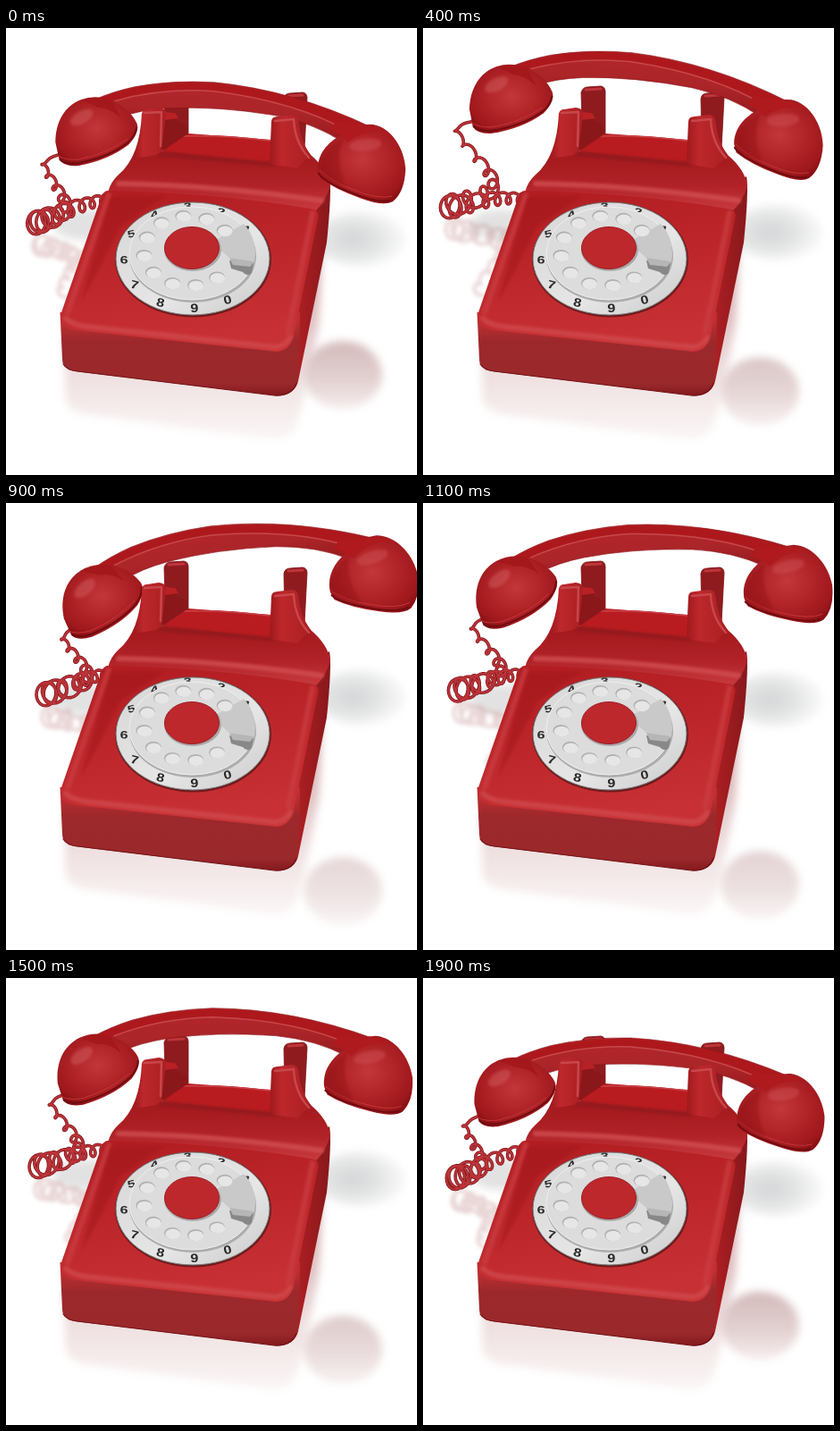
Animation, 460 px wide and 500 px high, one loop 2900 ms. Source, as an HTML page:

```html
<!DOCTYPE html>
<html lang="en">
<head>
<meta charset="utf-8">
<title>Ringing telephone</title>
<style>
html, body { margin: 0; width: 100%; height: 100%; overflow: hidden; background: #fff; }
svg { display: block; width: 460px; height: 500px; }
.line { fill: none; stroke-linecap: round; stroke-linejoin: round; }
.soft { filter: blur(5px); }
.mist { filter: blur(2px); }
.glow { filter: blur(1.5px); }
text { font: bold 14px "Liberation Sans", Arial, sans-serif; fill: #292929; text-anchor: middle; }
</style>
</head>
<body>
<svg viewBox="0 0 460 500">
  <defs>
    <linearGradient id="floor" x1="0" y1="0" x2="0" y2="1">
      <stop offset=".25" stop-color="#d9b4b5"/><stop offset=".65" stop-color="#eedfdf"/><stop offset="1" stop-color="#fbf6f6"/>
    </linearGradient>
    <linearGradient id="blob" x1="0" y1="0" x2="0" y2="1">
      <stop offset="0" stop-color="#d3b9ba"/><stop offset=".55" stop-color="#e2d0d0"/><stop offset="1" stop-color="#f6eded"/>
    </linearGradient>
    <radialGradient id="shade" cx=".42">
      <stop offset="0" stop-color="#d4d6d7"/><stop offset=".6" stop-color="#e3e4e4"/><stop offset="1" stop-color="#f4f4f4"/>
    </radialGradient>
    <linearGradient id="plate" x1="0" y1="0" x2=".25" y2="1">
      <stop offset="0" stop-color="#b01c20"/><stop offset=".45" stop-color="#bb2529"/><stop offset="1" stop-color="#c73135"/>
    </linearGradient>
    <linearGradient id="front" x1="0" y1="0" x2="0" y2="1">
      <stop offset=".1" stop-color="#bd2f33"/><stop offset=".35" stop-color="#9c282b"/><stop offset=".85" stop-color="#9a292c"/><stop offset="1" stop-color="#83191d"/>
    </linearGradient>
    <linearGradient id="side">
      <stop offset="0" stop-color="#c12a2f"/><stop offset=".5" stop-color="#a41d21"/><stop offset="1" stop-color="#86181c"/>
    </linearGradient>
    <linearGradient id="neck" x1="0" y1="0" x2="0" y2="1">
      <stop offset="0" stop-color="#b91d21"/><stop offset=".45" stop-color="#a51a1e"/><stop offset=".75" stop-color="#b02227"/><stop offset="1" stop-color="#c73a3f"/>
    </linearGradient>
    <linearGradient id="prong">
      <stop offset="0" stop-color="#9e191d"/><stop offset=".3" stop-color="#bd282c"/><stop offset="1" stop-color="#aa1f23"/>
    </linearGradient>
    <linearGradient id="grip" x1="0" y1="0" x2="0" y2="1">
      <stop offset="0" stop-color="#b4262a"/><stop offset=".5" stop-color="#ab2529"/><stop offset="1" stop-color="#971a1e"/>
    </linearGradient>
    <radialGradient id="cup" cx=".5" cy=".45" r=".62">
      <stop offset="0" stop-color="#c2373b"/><stop offset=".5" stop-color="#b02327"/><stop offset=".85" stop-color="#9e181c"/><stop offset="1" stop-color="#880f13"/>
    </radialGradient>
    <linearGradient id="ring" x1="0" y1="0" x2="1" y2="1">
      <stop offset="0" stop-color="#d6d6d6"/><stop offset=".6" stop-color="#e6e6e6"/><stop offset="1" stop-color="#cacaca"/>
    </linearGradient>
  </defs>

  <!-- floor -->
  <ellipse id="rear" cx="396" rx="50" ry="31" fill="url(#shade)" class="soft"/>
  <ellipse cx="88" cy="220" rx="36" ry="17" fill="#e2e2e2" class="soft"/>
  <path class="soft" fill="url(#floor)" d="M66 350L354 245L350 330Q338 400 326 442Q318 462 296 460L88 432Q66 428 66 410Z"/>
  <ellipse id="pool" cx="377" rx="44" ry="38" fill="url(#blob)" class="soft"/>
  <path id="ghost" class="line mist" stroke="#b46f72" stroke-width="4" opacity=".28"/>

  <!-- cord -->
  <path class="line cord" stroke="#85191d" stroke-width="3.6"/>
  <path class="line cord" stroke="#bd3439" stroke-width="1.9"/>

  <!-- rear prongs -->
  <g stroke="#7f1115" stroke-width=".8" fill="#8f1b1f">
    <path d="M177 72Q179 66 184 66L199 65Q204 66 204 71V119L190 126L178 106Z"/>
    <path d="M311 79Q312 73 318 73L332 72Q337 73 337 78L334 135L312 126Z"/>
  </g>
  <path class="line" stroke="#bf353a" stroke-width="3" d="M182 69L199 68M316 76L332 75"/>

  <!-- body -->
  <path fill="url(#side)" d="M340 178L362 166Q365 180 359 240L327 395Q324 409 306 411L314 345Z"/>
  <path fill="url(#neck)" d="M152 95L175 138L187 120Q240 118 297 126L300 150L327 102Q330 128 341 142Q360 158 363 176Q358 194 347 204L114 184Q117 172 126 164Q150 144 152 95Z"/>
  <path fill="#b91c20" d="M204 118L297 125V151L176 138Z"/>
  <path fill="#931a1e" class="glow" d="M174 138L297 150L302 155L168 143Z"/>
  <path class="line" stroke="#c94449" stroke-width="1.5" d="M198 121Q245 120 296 126"/>
  <path fill="url(#front)" d="M60.5 318H329L327 393Q323 413 301 411L77 384Q63 382 63 370Z"/>
  <path fill="url(#plate)" d="M114 182Q235 184 346 203Q351 207 349 214L322 344Q317 362 302 362L77 338Q60 335 61 321L106 191Q109 182 114 182Z"/>
  <path class="line glow" stroke="#d04e52" stroke-width="6" opacity=".8" d="M126 174Q235 176 353 193"/>
  <path class="line glow" stroke="#c93d42" stroke-width="6" opacity=".75" d="M343 207L316 340M115 187L69 318"/>
  <path fill="#a0171b" opacity=".5" class="glow" d="M117 189L178 188L128 222L105 268L84 306Z"/>
  <path class="line glow" stroke="#d04c50" stroke-width="6" opacity=".7" d="M67 325Q74 332 90 334L302 357Q314 355 318 346"/>
  <path class="line" stroke="#741216" stroke-width="1.2" d="M64 376Q69 383 80 384L300 411Q320 412 325 397"/>

  <!-- dial -->
  <ellipse cx="209.5" cy="259" rx="87.5" ry="64.5" fill="#70191b"/>
  <ellipse cx="209" cy="258" rx="86" ry="63" fill="url(#ring)" stroke="#777"/>
  <g id="digits"></g>
  <ellipse cx="209" cy="255" rx="71" ry="52" fill="#adadad"/>
  <ellipse cx="208" cy="252" rx="70" ry="52" fill="#dcdcdc" stroke="#efefef"/>
  <path fill="#c9c9c9" d="M230 240L266 219Q282 236 278 261L250 257Z"/>
  <g id="holes"></g>
  <ellipse cx="209" cy="248" rx="32" ry="24" fill="#a9a9a9"/>
  <ellipse cx="208" cy="246" rx="30.5" ry="23.5" fill="#bd282d" stroke="#9f1c22"/>
  <path fill="#888" d="M250 260L277 263L275 274Q270 279 265 273L252 269Z"/>
  <path fill="#b6b6b6" d="M250 257L278 261L273 267L254 265Z"/>

  <!-- handset -->
  <g id="handset">
    <path fill="url(#grip)" stroke="#8b1216" stroke-width=".6" d="M98 92Q118 82 143 75.500Q185 66 232 67Q320 72 409 110L378 128Q345 108 300 101Q235 93 180 98Q150 101 129 110L108 105Z"/>
    <path fill="#ad181c" d="M99 92Q118 83 143 76.500Q185 67 232 68Q320 73 402 108L386 117Q325 85 232 77Q175 75 122 92Z"/>
    <path class="line" stroke="#c6484c" stroke-width="1.500" d="M122 92Q175 75 232 77Q325 85 386 117"/>
    <path fill="url(#cup)" d="M57 141C56 119 65 100 84 92Q99 86 116 91Q138 99 147 116Q151 126 139 140Q118 158 84 166Q67 168 62 160Z"/>
    <path class="line" stroke="#6f0c10" stroke-width="2" d="M63 160Q69 165 84 163Q118 155 138 138Q146 130 147 121"/>
    <path class="line" stroke="#c5383d" stroke-width=".9" d="M61 156Q69 161 84 159Q116 151 137 134"/>
    <path fill="#a4171b" d="M86 93Q101 86 118 92L129 111Q117 100 103 100Z"/>
    <ellipse cx="85" cy="112" rx="14" ry="7" fill="#d56a6d" opacity=".4" transform="rotate(-32 85 112)" class="glow"/>
    <path fill="url(#cup)" d="M351 160C350 140 363 127 379 118Q394 106 411 107C432 110 447 133 449 155Q449 181 436 192Q426 198 401 190Q371 181 354 169Z"/>
    <path class="line" stroke="#6f0c10" stroke-width="2" d="M352 164Q359 173 387 183Q418 195 433 191"/>
    <path class="line" stroke="#c5383d" stroke-width=".9" d="M353 160Q368 173 390 180Q420 191 435 186"/>
    <path fill="#8e1115" opacity=".4" class="glow" d="M352 158Q352 140 378 124Q369 148 383 178Q361 173 352 158Z"/>
    <path fill="#ae1a1e" d="M370 105L402 108Q417 109 426 117Q401 111 383 128Q373 119 362 114Z"/>
    <ellipse cx="403" cy="130" rx="18" ry="7" fill="#d25a5e" opacity=".4" transform="rotate(-8 403 130)" class="glow"/>
  </g>

  <!-- front prongs -->
  <path fill="#8a171a" d="M174 96L190 98L191 104L204 110V118L174 138Z"/>
  <path fill="#b82126" d="M178 94L189 95L193 101L177 103Z"/>
  <path fill="url(#prong)" d="M152 96Q153 91 158 91L171 89Q179 90 179 95L174 138L168 142Q150 145 143 146Q154 119 152 96Z"/>
  <path class="line" stroke="#c8474b" stroke-width="2.500" d="M155 95L174 94L173 132"/>
  <path fill="url(#prong)" d="M297 105Q297 99 304 99L320 97Q327 98 327 104Q329 128 341 142L326 157L300 153L295 149Z"/>
  <path class="line" stroke="#c8474b" stroke-width="2.500" d="M301 104L322 102Q323 128 339 145"/>
</svg>
<script>
const LOOP = 2900, STEP = 100, LAST = 19;
const REST = { x: 251, y: 138.5, tilt: 4.4, span: 299 };
const SWING = [[0, 6.7], [3.5, 8.8], [7.5, -6.3], [12.5, 0], [LAST, REST.tilt]];

const $ = id => document.getElementById(id);
const cords = document.querySelectorAll('.cord');
const rad = deg => deg * Math.PI / 180;

// quick rise, long float, quick fall: 0..1
function liftAt(step) {
  const u = (step + .4) / LAST;
  return Math.max(0, 1 - Math.abs(1 - 2 * u) ** 3);
}

function tiltAt(step) {
  const i = Math.max(1, SWING.findIndex(([at]) => at >= step));
  const [t0, a] = SWING[i - 1], [t1, b] = SWING[i];
  return a + (b - a) * (1 - Math.cos(Math.PI * (step - t0) / (t1 - t0))) / 2;
}

// Catmull-Rom through the knots
function along(knots, t) {
  const last = knots.length - 1, i = Math.min(last - 1, Math.floor(t)), u = t - i;
  const at = j => knots[Math.max(0, Math.min(last, j))];
  return knots[i].map((b, k) => {
    const a = at(i - 1)[k], c = at(i + 1)[k], d = at(i + 2)[k];
    return b + u / 2 * (c - a + u * (2 * a - 5 * b + 4 * c - d + u * (3 * (b - c) + d - a)));
  });
}

// knots are [x, y, radius, turns]
function coil(knots, count = 360) {
  let d = '';
  for (let i = 0; i <= count; i++) {
    const [x, y, r, turns] = along(knots, i / count * (knots.length - 1));
    const a = turns * Math.PI * 2;
    d += (i ? 'L' : 'M') + (x + .8 * r * Math.cos(a)).toFixed(1) + ' ' + (y + r * Math.sin(a)).toFixed(1);
  }
  return d;
}

function ring(cx, cy, rx, ry, start, step, mark) {
  return Array.from({ length: 10 }, (_, i) => {
    const a = rad(start + step * i), c = Math.cos(a), s = Math.sin(a);
    return mark(cx + rx * c, cy + ry * s, i, c, s);
  }).join('');
}

function buildDial() {
  $('holes').innerHTML = ring(204, 249, 50, 39, 50, 30.5, (x, y) =>
    `<ellipse cx="${x}" cy="${y}" rx="9" ry="6.500" fill="#b0b0b0"/>` +
    `<ellipse cx="${x + .6}" cy="${y + 1}" rx="8.400" ry="5.800" fill="#e6e6e6"/>`);
  $('digits').innerHTML = ring(207, 256, 75, 57, 57, 30, (x, y, i, c, s) =>
    `<text transform="translate(${x} ${y}) rotate(${-32 * c * s}) scale(1.15 ${.85 + .12 * s})" y="5">${i && 10 - i}</text>`);
}

function draw(step) {
  const lift = liftAt(step), tilt = tiltAt(step);
  const mx = 255 - .8 * tilt, my = REST.y - 44 * lift;
  const half = REST.span / 2 + 2.5 * lift;
  const turn = tilt - REST.tilt, scale = 2 * half / REST.span;
  $('handset').setAttribute('transform',
    `translate(${mx} ${my}) rotate(${turn}) scale(${scale}) translate(${-REST.x} ${-REST.y})`);

  const dx = half * Math.cos(rad(tilt)), dy = half * Math.sin(rad(tilt));
  const cup = { x: mx - dx, y: my - dy };
  const a = rad(turn), ox = -40, oy = 27;
  const sx = cup.x + ox * Math.cos(a) - oy * Math.sin(a);
  const sy = cup.y + ox * Math.sin(a) + oy * Math.cos(a);

  // the cord hangs from the left cup, doubles back at its tip, ends in the body
  const kx = 66 + 20 * lift + cup.x - 102, ky = 196 + .7 * (cup.y - 108);
  const tx = 37 + 1.6 * (cup.x - 103), ty = 216 + .5 * (cup.y - 112);
  const knots = [
    [sx, sy, 0, 0], [sx - 12 - .8 * tilt, sy + 13, 3, .6], [kx, ky, 8, 4.6],
    [tx, ty, 13, 8.3], [(tx + 115) / 2 + 3, (ty + 190) / 2 - 3, 8, 11.6], [116, 190, 5, 15]
  ];
  const path = coil(knots);
  cords.forEach(c => c.setAttribute('d', path));
  $('ghost').setAttribute('d', coil(knots.map(([x, y, r, n]) =>
    [x + 5 + .2 * (ty - y), ty + 25 + .8 * (ty - y), r * .9, n])));

  const rise = 151 - (my + dy);
  $('pool').setAttribute('cy', 388 + .66 * rise);
  $('pool').setAttribute('opacity', 1 - .006 * rise);
  $('rear').setAttribute('cy', 236 - .27 * rise);
}

let shown = -1;
function tick() {
  const step = Math.min(LAST, Math.floor(performance.now() % LOOP / STEP));
  if (step !== shown) draw(shown = step);
  requestAnimationFrame(tick);
}

buildDial();
tick();
</script>
</body>
</html>
```
